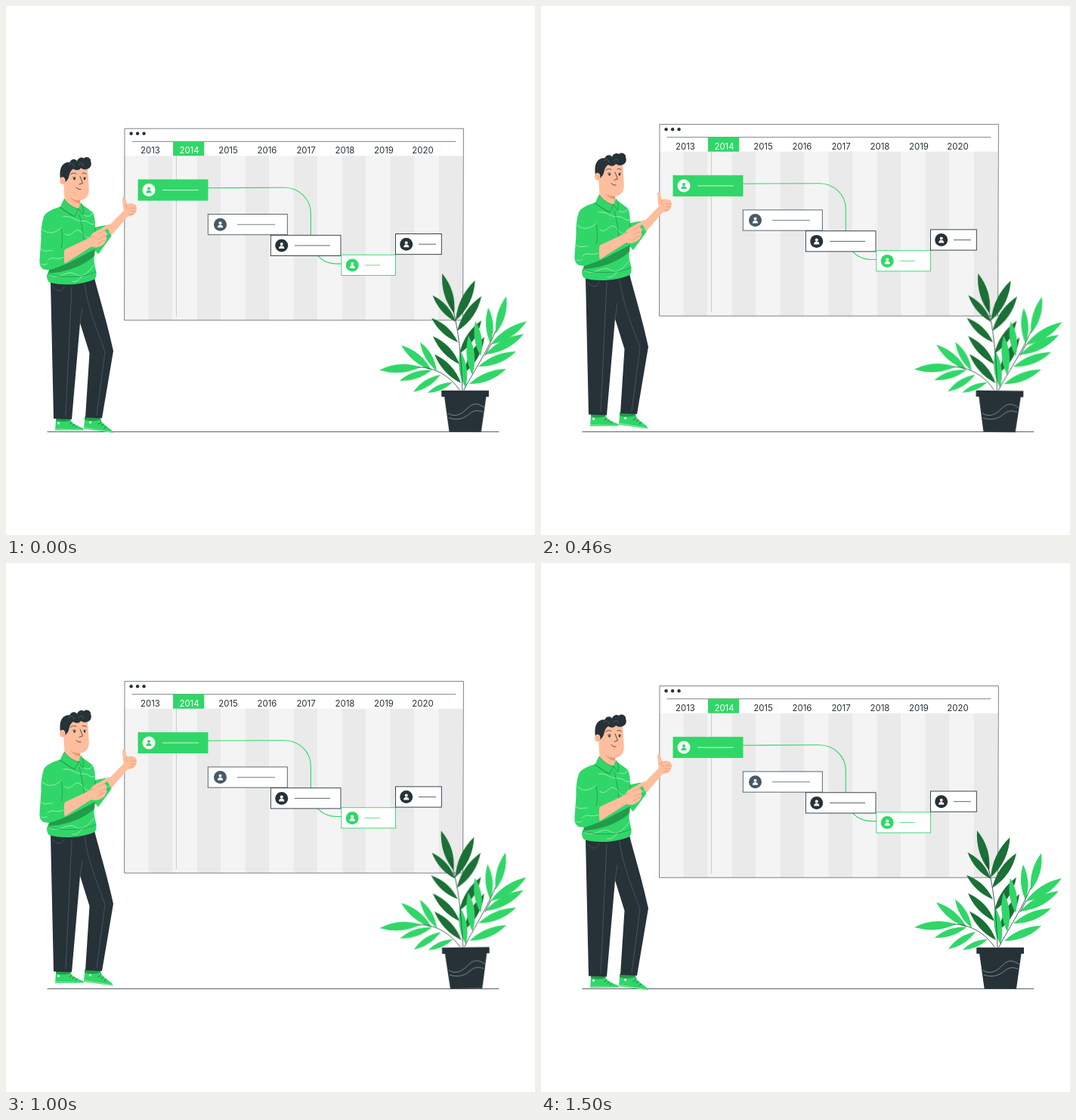
Write an HTML page that moves like this. It is 700 px wide and 700 px high and loops after 1540 ms.

```html
<!DOCTYPE html>
<html lang="en">
<head>
<meta charset="utf-8">
<title>Timeline</title>
<style>
  html, body { margin: 0; width: 100%; height: 100%; overflow: hidden; background: #fff; }
  svg { display: block; width: 100vw; height: 100vh; }
  .float { animation: float 1540ms linear -40ms infinite; }
  .sway { transform-origin: 591px 459px; animation: sway 1540ms linear -40ms infinite; }
  @keyframes float { 50% { transform: translateY(-9.4px); } }
  @keyframes sway {
    25% { transform: rotate(1deg); }
    75% { transform: rotate(-1deg); }
  }
  text { font: 11.4px Inter, "Open Sans", sans-serif; text-anchor: middle; fill: #263238; }
  .ink { fill: #263238; }
  .green { fill: #30d768; }
  .shade { fill: #229b4a; }
  .skin { fill: #ffbe9d; }
  .line { fill: none; stroke: #263238; stroke-width: .8; stroke-linecap: round; stroke-linejoin: round; }
  .thin { stroke-width: .6; }
  .pale { stroke: #b4f0c8; }
  .seam { stroke: #64737b; stroke-width: .5; }
  .crease { stroke: #e98862; }
</style>
</head>
<body>
<svg viewBox="0 0 700 700">
  <path class="line" d="M55 563.4H652"/>

  <g class="float">
    <g id="board">
      <path d="M157.4 162.7H605.4L604.6 416.3H157Z" fill="#fff"/>
      <g id="columns"></g>
      <path class="line thin" d="M157.4 162.7H605.4L604.6 416.3H157Z"/>
      <path class="line thin" d="M167 179.8H595"/>
      <path class="green" d="M221 179.6h41.2v19.2H221z"/>
      <path class="line thin" d="M225.4 199V411" style="stroke:#8fc3a0"/>
      <g class="ink">
        <circle cx="165.6" cy="169.3" r="2.2"/><circle cx="174.1" cy="169.3" r="2.2"/><circle cx="182.6" cy="169.3" r="2.2"/>
      </g>
      <g id="years"></g>
      <path class="line" style="stroke:#30d768;stroke-width:1.1" d="M267 241.3L368 240.8C388 240.8 403.3 256 403.3 275V305C403.3 326 417 341.6 437 341.6H444"/>
      <g id="tasks"></g>
    </g>

    <g id="man">
      <!-- shoes -->
      <path class="shade" d="M66 545H84L87 552H66ZM104 544H124L127 552H104Z"/>
      <path class="green" d="M66 549C72 551 79 551 85 549C90 555 97 557 102 559L103 562H65ZM104 548C110 550 118 550 124 548C129 554 135 558 140 562L141.500 565.500L103 560Z"/>
      <path class="line pale" d="M65 560.500L102 561.500M103.500 558.500L140 564.500"/>
      <path class="line thin" d="M84 554l3-2M88 556l3-2M92 558l2-2M122 554l3-2M126 556l3-2M130 559l3-2"/>
      <g fill="#d6f7e1"><circle cx="69.500" cy="552.500" r="1.700"/><circle cx="111.500" cy="551.500" r="1.700"/></g>

      <!-- trousers -->
      <path class="ink" d="M59 366L117 360C121 378 131 408 142 457L127 546L105 545L110.500 460L98 420L87 547.500L63 546.500Z"/>
      <path class="line seam" d="M87 372L79 543M104 368C108 400 121 430 131 458L120 542M62 372C66 379 75 379 77 371M98 420L101 400"/>

      <!-- raised forearm -->
      <path class="skin" d="M128 300L156 271C154 265 155 260 154 255C154 252 157 252 158 255L160 262.500C164 261 169 261.500 172 264C173.500 268 173 272 171 275C168 278 164 279 161 279L137 307Z"/>
      <path class="line thin crease" d="M160 262.500C158 266 159 268 162 269M165 268H172M165 272H171M163 276H168"/>
      <path class="green" d="M114 294L132 290.500L139.500 305L122 329L115 321Z"/>

      <!-- shirt -->
      <path class="green" d="M77 256C74 260 73 264 72 266C62 269 53 273 50 279C47 288 46 298 46.500 308L44.500 336C44 343 46 347 50 349L57 350L54 357C54 361 55 364 57 366C72 371 101 370 117 362C119 360 120 357 119.500 353L116.500 338L118 294C118 284 117 276 114 273C109 269 105 266 100 263Z"/>
      <path class="shade" d="M57 350C68 347 76 343 84 340L118 322L117 331C103 345 74 354 56 354Z"/>
      <g class="line pale">
        <path d="M48 296C57 304 66 300 73 294M78 302C87 310 91 289 101 301S111 305 117 300M76 279C87 277 92 286 101 285S110 291 117 289M46 322C53 329 60 320 66 327S73 331 77 329M47 342C54 347 59 333 69 339M57 356C70 364 81 349 91 355S108 354 117 343M88 365C94 366 98 362 101 357M122 312C127 316 132 302 136 301M116 273C110 283 105 277 102 277"/>
      </g>
      <path class="line thin" style="stroke:#227c40" d="M71 267C77 270 83 277 91 279M97 277C101 290 103 310 104 320M73 295C75 304 75 314 73 321M78 322L61 326M55 355C75 361 104 360 119 352M118 294L117 319M128 297L135 307"/>

      <!-- pointing arm -->
      <path class="skin" d="M77 323L111 307C114 300 120 298 124 296L135 289.500C138 288.500 139 291 137 293L130 298C133 299 134 302 133 305C134 309 132 312 130 315C127 318 119 322 113 319L77 342Z"/>
      <path class="green" d="M59 325L78 321C76 329 76 335 78 342L58 349C53 343 53 333 59 325Z"/>
      <path class="line thin crease" d="M130 298L122 302M133 305C129 305 126 307 123 309M131 311C127 310 125 313 122 315M111 307L116 305"/>
      <path class="line pale" d="M55 337C62 330 66 338 76 333"/>

      <!-- head -->
      <path class="skin" d="M76 230L77.500 257C81 264 90 270 97 268L99 255Z"/>
      <path d="M84 252C88 257 94 258 98 257.500L98 262C92 261 87 257 84 252Z" fill="#ee966f"/>
      <path class="skin" d="M77 224L84 213H108L109.800 243C110 252 105 257.500 97 257.500C87 257 79 250 77 237Z"/>
      <path class="ink" d="M73 235C70 222 71 211 79 208C82 206 84 209 85 206C88 202 93 203 94 206C95 201 101 200 103 202C108 198 113 203 112 206C114 210 112 215 108 216C104 218 101 216 99 215C96 219 92 218 89 216C86 218 85 220 84 223C83 228 82 230 80 232L77 235Z"/>
      <ellipse class="skin" cx="74.800" cy="231.800" rx="3.700" ry="5"/>
      <path class="line thin crease" d="M73 230C76 230 77 233 75 235"/>
      <path class="line thin" style="stroke:#607078" d="M83 211C86 207 90 210 90 213M96 211C98 207 103 208 102 212"/>
      <path class="line" d="M85.500 223.500C88 221 91 221.500 93 222.500M101 222C103 221 105 221.500 106.500 223M93 240.500C95 243 97 243.500 99 243M98 226L101.500 235L97 236.500"/>
      <g class="ink"><ellipse cx="90.500" cy="229" rx="1.300" ry="1.700"/><ellipse cx="104" cy="229" rx="1.200" ry="1.700"/></g>
      <path class="line thin" d="M88 227.500C89.500 226.500 91 226.500 92.500 227.500M102.500 227.300H106"/>

      <!-- collar -->
      <path class="green" d="M77 256C83 264 90 268 96 269L91 279C84 276 77 270 72 267ZM99 261C102 264 103 270 102 277L96 269Z"/>
      <path class="line thin" style="stroke:#227c40" d="M77 256C83 264 90 268 96 269L91 279C84 276 77 270 72 267M99 261C102 264 103 270 102 277L96 269"/>
    </g>
  </g>

  <g class="sway">
    <g id="leaves"></g>
    <path class="line" d="M604 508C603 470 599 422 588 390M606 508C615 490 634 462 648 430M634 462L642 447M600 508C588 490 568 478 546 478"/>
    <path class="ink" d="M576.300 508.700H639V517H576.300ZM580 516H635.700L629 563.500H586.700Z"/>
    <path class="line thin" style="stroke:#b9c3c8" d="M585 539C595 545 603 540 611 532S625 526 633 531M586 545C597 549 606 546 613 540S625 535 631 537"/>
  </g>
</svg>

<script>
  const GREEN = '#30d768', DARK = '#263238', SLATE = '#455a64', FOREST = '#1a7035';
  const add = (id, html) => document.getElementById(id).insertAdjacentHTML('beforeend', html);

  for (let i = 0; i < 14; i++) {
    const x = 156.500 + i * 32;
    add('columns', `<rect x="${x}" y="198.800" width="32" height="217.200" fill="${i % 2 ? '#eaeaea' : '#f4f4f4'}"/>`);
  }

  for (let i = 0; i < 8; i++) {
    const fill = i === 1 ? ' style="fill:#fff"' : '';
    add('years', `<text x="${191 + i * 51.500}" y="195.800"${fill}>${2013 + i}</text>`);
  }

  // A bar with a round avatar and a placeholder line
  function task(x, y, w, color, cx, x1, x2, solid) {
    const front = solid ? '#fff' : color, back = solid ? color : '#fff', cy = y + 13.700;
    add('tasks', `<rect x="${x}" y="${y}" width="${w}" height="27.200" fill="${back}" stroke="${color}" stroke-width=".9"/>
      <circle cx="${cx}" cy="${cy}" r="8.500" fill="${front}"/>
      <g transform="translate(${cx} ${cy})" fill="${back}"><circle cy="-2" r="2"/><path d="M-3.700 4C-3.500 1-1.800 .2 0 .2S3.500 1 3.700 4Z"/></g>
      <path d="M${x1} ${cy}H${x2}" stroke="${front}" stroke-width=".75"/>`);
  }
  task(175, 230.400, 92, GREEN, 189, 207, 255, true);
  task(267.300, 276, 105, SLATE, 283.500, 306, 356);
  task(350.300, 303.800, 92.700, DARK, 364.700, 382, 429);
  task(443.800, 329.800, 71.700, GREEN, 458.200, 474.500, 495);
  task(515.500, 302, 60.800, DARK, 529.700, 546, 569);

  // Leaf from base (x, y) to tip (u, v)
  function leaf([x, y, u, v], color) {
    const dx = u - x, dy = v - y;
    const side = k => `${x + dx * .5 - dy * k} ${y + dy * .5 + dx * k}`;
    add('leaves', `<path fill="${color}" d="M${x} ${y}Q${side(.21)} ${u} ${v}Q${side(-.19)} ${x} ${y}Z"/>`);
  }
  const back = [
    [593, 407, 577, 354], [595, 416, 620.500, 363], [595, 418, 564.500, 383],
    [597, 430, 629, 384], [598, 445, 563, 413], [600, 460, 629, 416],
    [600, 474, 565, 437], [602, 499, 567, 461], [606, 486, 633, 438]
  ];
  const front = [
    [648, 433, 662, 384], [641, 446, 638, 399], [641, 448, 689, 417],
    [634, 461, 685, 434], [625, 477, 675, 457], [613, 500, 662, 480],
    [628, 463, 621, 417], [617, 488, 612, 436], [608, 505, 601, 456],
    [549, 478, 494, 482], [563, 482, 523, 449], [570, 483, 548, 445],
    [563, 482, 521, 496], [575, 488, 539, 511], [591, 498, 558, 512]
  ];
  back.forEach(p => leaf(p, FOREST));
  front.forEach(p => leaf(p, GREEN));
</script>
</body>
</html>
```
